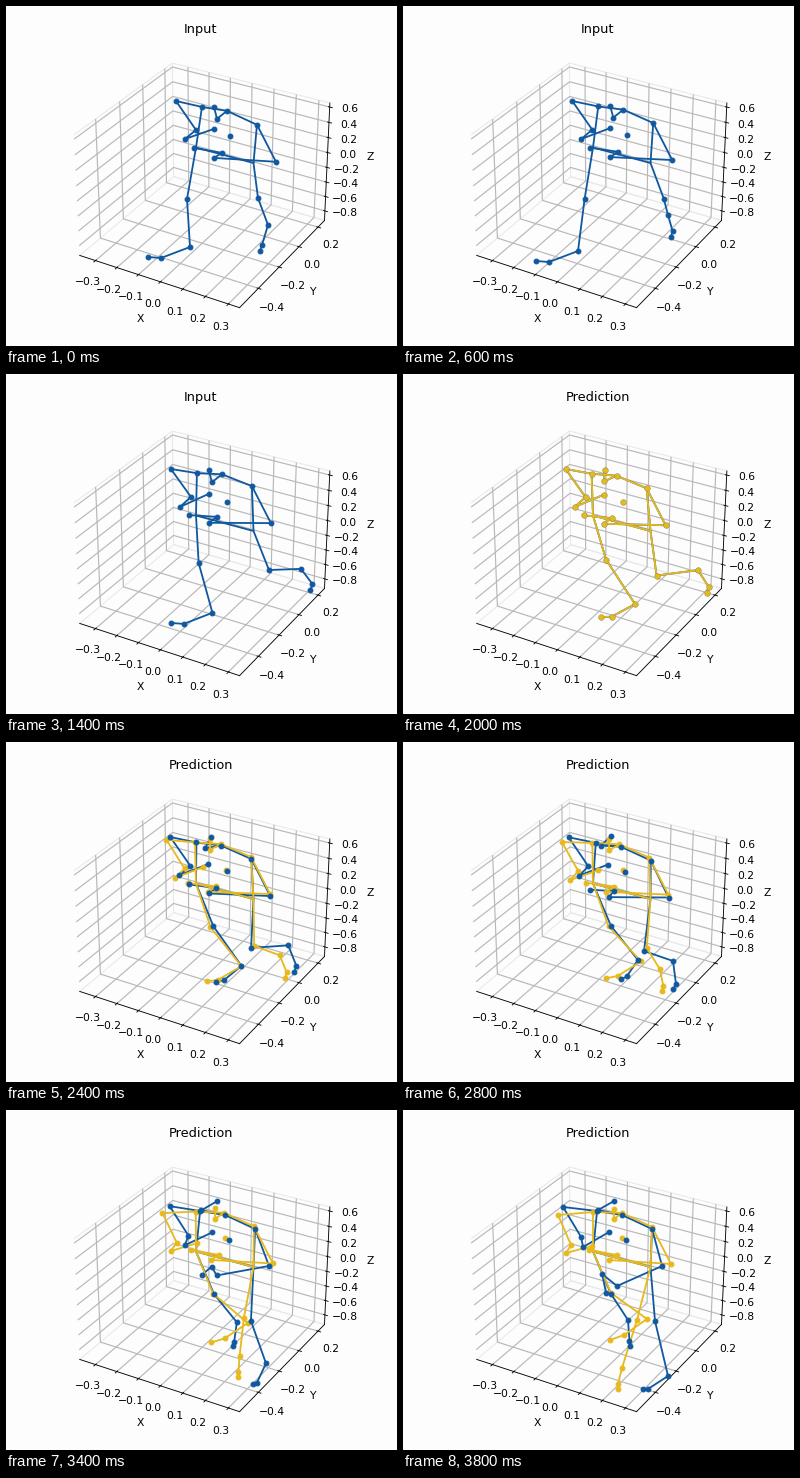
These frames come from a looping animation (391 by 340 pixels, 4000 ms). A matplotlib script:

```python
import numpy as np
import matplotlib.pyplot as plt
from matplotlib.animation import FuncAnimation

W, H, DPI = 391, 340, 77
FRAMES, SWITCH = 20, 10
BLUE, GOLD, PAPER = "#1058a0", "#e8b91c", "#fdfdfd"
T = np.arange(FRAMES)[:, None]

CHAINS = [chain.split() for chain in (
    "l_tip l_hand l_wrist l_elbow l_shoulder neck "
    "r_shoulder r_elbow r_wrist r_hand r_tip",
    "l_shoulder l_hip r_hip r_shoulder",
    "l_hip l_knee l_ankle l_heel l_toe",
    "r_hip r_knee r_ankle r_heel r_toe",
    "neck head crown",
)]
HIPS = {"l_hip": (190, 141.5), "r_hip": (247.5, 157)}


def ease(start, end):
    u = np.clip((T - start) / (end - start), 0, 1)
    return u * u * (3 - 2 * u)


def hump(mid, width):
    return np.exp(-((T - mid) / width)**2)


def blend(a, b, w):
    return np.asarray(a) * (1 - w) + np.asarray(b) * w


def path(**keys):
    """Smooth curve through points given as t<frame>=(x, y)."""
    k = np.array([int(name[1:]) for name in keys], float)
    p = np.array(list(keys.values()), float)
    m = np.gradient(p, k, axis=0, edge_order=2)
    i = np.clip(np.searchsorted(k, T[:, 0], side="right") - 1, 0, len(k) - 2)
    h = (k[i + 1] - k[i])[:, None]
    u = (T - k[i][:, None]) / h
    return ((1 + 2 * u) * (1 - u)**2 * p[i] + u * (1 - u)**2 * h * m[i]
            + u**2 * (3 - 2 * u) * p[i + 1] + u**2 * (u - 1) * h * m[i + 1])


def sway(p):
    """The upper body leans left while its right side lifts."""
    lift = np.clip((p[..., :1] - 180) / 60, 0, 1)
    lean = -6.5 * hump(9.5, 4) - .1 * T
    return p + np.hstack([lean, -7 * hump(7.5, 4) * lift])


# Upper body: a resting pose, and where the arms end up
REST = dict(
    neck=(221, 105), l_shoulder=(196, 101), r_shoulder=(251, 119),
    l_elbow=(170, 95), l_wrist=(190, 124), l_hand=(179, 133), l_tip=(208, 123),
    r_elbow=(270, 156), r_wrist=(208, 152), r_hand=(216, 147), r_tip=(188, 142),
)
REACH = dict(
    l_elbow=(162, 97), l_wrist=(180, 127), l_hand=(182, 137), l_tip=(208, 122),
    r_elbow=(261, 156), r_wrist=(216, 176), r_hand=(201, 164), r_tip=(205, 183),
)


def observe():
    swing = np.clip((T - 11) / 8, 0, 1)**2
    j = {n: sway(blend(p, REACH.get(n, p), swing)) for n, p in REST.items()}
    nod = ease(7, 18)
    j["head"] = j["neck"] + blend((-10, 8), (-24, -5), nod)
    j["crown"] = j["neck"] + blend((-13, -4), (-8, -14), nod)
    j["spine"] = j["neck"] / 2 + (113.5, 77.5)

    roll = ease(6, 21)
    j["l_knee"] = blend((181, 193), (208, 184), ease(2, 13))
    j["l_ankle"] = path(t0=(184, 241), t3=(175, 245), t10=(232, 230),
                        t14=(235, 218), t19=(225, 210))
    j["l_heel"] = j["l_ankle"] + blend((-29, 11), (3, 21), roll)
    j["l_toe"] = j["l_heel"] + blend((-13, -1), (1, 6), roll)

    j["r_knee"] = path(t0=(252, 192), t7=(263, 196), t14=(241, 209), t19=(252, 211))
    j["r_ankle"] = path(t0=(262, 219), t3=(265, 209), t8=(299, 194),
                        t14=(270, 219), t16=(261, 244), t19=(265, 266))
    j["r_heel"] = j["r_ankle"] + path(t0=(-6, 20), t10=(11, 17), t14=(3, 23),
                                      t19=(-20, 13))
    j["r_toe"] = j["r_heel"] + blend((-2, 6), (-5, 0), ease(12, 19))
    return j


def predict(seen):
    """Drift from the last observed pose to a guessed one."""
    goal = {n: np.array(p) - 2 for n, p in REST.items()}
    goal.update(
        head=(211, 109), crown=(211, 99), spine=(219, 128), l_shoulder=(190, 102),
        l_elbow=(155, 105), l_wrist=(168, 135), l_hand=(163, 143), l_tip=(189, 136),
        l_knee=(208, 183), l_ankle=(244, 209), l_heel=(221, 225), l_toe=(207, 230),
        r_knee=(234, 210), r_ankle=(219, 258), r_heel=(215, 274), r_toe=(215, 279),
    )
    w = np.clip((T - SWITCH) / (FRAMES - 1 - SWITCH), 0, 1)**.85
    return {n: blend(seen[n][SWITCH], p, w) for n, p in goal.items()}


class Skeleton:
    def __init__(self, ax, joints, color):
        hips = {n: np.tile(p, (FRAMES, 1)) for n, p in HIPS.items()}
        self.bones = {**joints, **hips}
        self.joints = joints
        self.lines = [ax.plot([], [], color=color, lw=1.7)[0] for _ in CHAINS]
        self.dots = ax.scatter([], [], s=20, color=color)

    def draw(self, frame, visible, order):
        for line, chain in zip(self.lines, CHAINS):
            line.set_data(*np.array([self.bones[n][frame] for n in chain]).T)
            line.set_visible(visible)
        self.dots.set_offsets([p[frame] for p in self.joints.values()])
        self.dots.set(visible=visible, zorder=order)


plt.rcParams.update({"grid.linewidth": 1.1, "grid.color": "#b8b8b8"})
fig = plt.figure(figsize=((W + 1e-6) / DPI, (H + 1e-6) / DPI), dpi=DPI, facecolor=PAPER)
side = 284.6
box = fig.add_axes([52.2 / W, 20.4 / H, side / W, side / H], projection="3d")
box.set_facecolor("none")
box.view_init(30, -60)
box.set(xlim=(-.375, .348), ylim=(-.574, .27), zlim=(-.934, .653),
        xlabel="X", ylabel="Y", zlabel="Z")
box.set_xticks(np.arange(-3, 4) / 10)
box.set_yticks(np.arange(-2, 2) / 5)
box.set_zticks(np.arange(-4, 4) / 5)
for axis in (box.xaxis, box.yaxis, box.zaxis):
    axis.pane.set(fill=False, edgecolor="#e9e9e9", alpha=1)
title = box.set_title("Input", pad=7.4)

stage = fig.add_axes([0, 0, 1, 1])
stage.axis("off")
observed = observe()
blue = Skeleton(stage, observed, BLUE)
gold = Skeleton(stage, predict(observed), GOLD)
stage.set(xlim=(0, W), ylim=(H, 0))


def update(frame):
    guess = frame >= SWITCH
    title.set_text("Prediction" if guess else "Input")
    blue.draw(frame, True, 5)
    gold.draw(frame, guess, 6 if frame < 12 else 4)
    return []


anim = FuncAnimation(fig, update, frames=FRAMES, init_func=lambda: update(0),
                     interval=200, repeat=True, repeat_delay=0)
plt.show()
```
